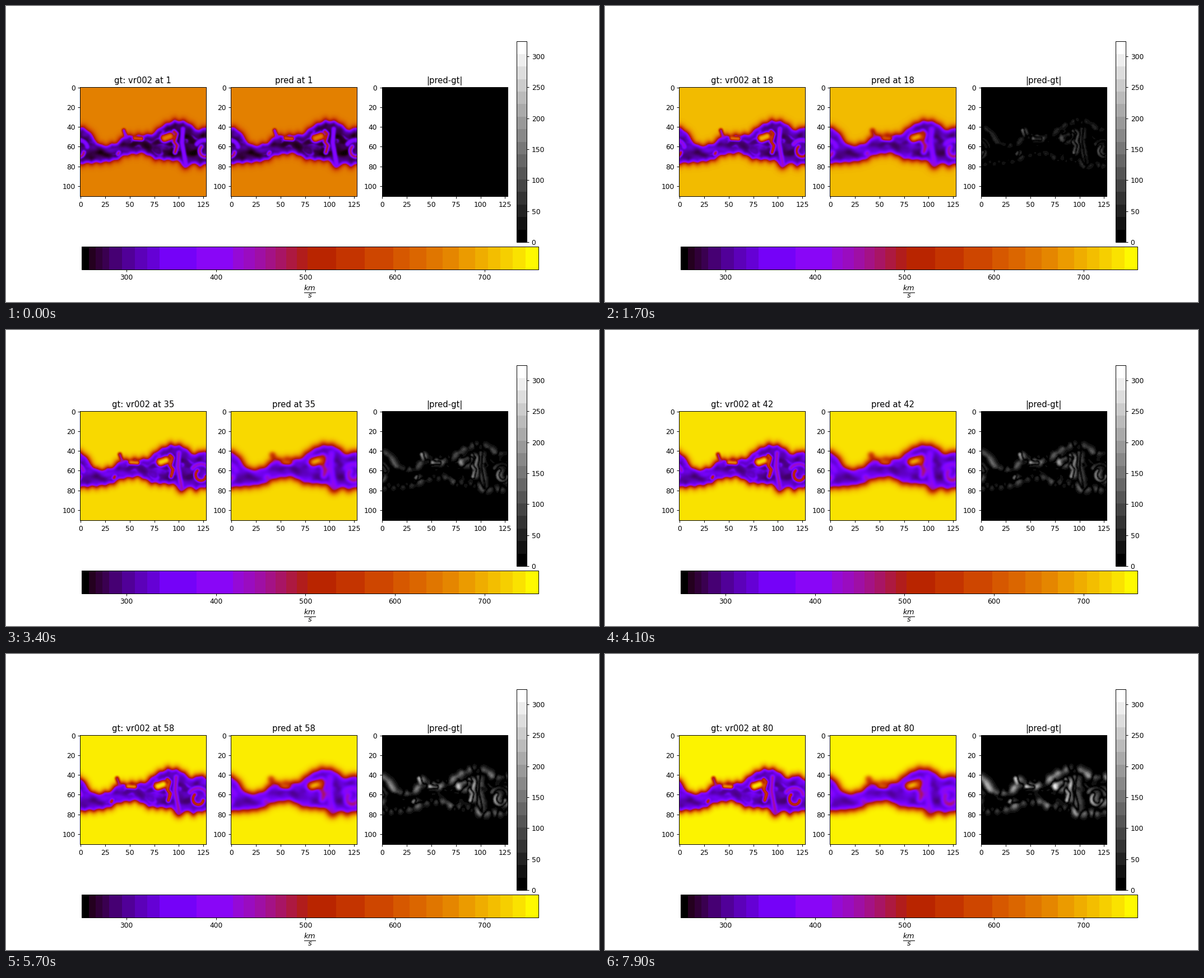
Recreate the animation shown at these times as a matplotlib script. Size 1058 px wide and 529 px high, loop 8000 ms.

```python
import numpy as np
import matplotlib.pyplot as plt
from matplotlib.animation import FuncAnimation
from matplotlib.cm import ScalarMappable
from matplotlib.colors import ListedColormap, Normalize

NX, NY, STEPS = 128, 111, 80
VMIN, VMAX, ERR_MAX = 250, 760, 324
CALM = 655  # undisturbed speed at the first step

X, Y = np.meshgrid(np.arange(NX, dtype=float), np.arange(NY, dtype=float))
KX = np.fft.fftfreq(NX)[None, :]
KY = np.fft.fftfreq(NY)[:, None]


def transform(field, shift=0.0, sx=0.0, sy=0.0):
    """Move the field left by shift and blur it."""
    gain = np.exp(-2 * np.pi ** 2 * ((sx * KX) ** 2 + (sy * KY) ** 2))
    spec = np.fft.fft2(field) * gain * np.exp(2j * np.pi * KX * shift)
    return np.fft.ifft2(spec).real


def noise(rng, sx, sy):
    n = transform(rng.normal(size=X.shape), 0, sx, sy)
    return n / n.std()


def dist(pts):
    """Distance to a polyline that repeats every NX columns."""
    best = np.full(X.shape, np.inf)
    for (x0, y0), (x1, y1) in zip(pts[:-1], pts[1:]):
        dx, dy = x1 - x0, y1 - y0
        for off in (-NX, 0, NX):
            px, py = X - x0 - off, Y - y0
            s = np.clip((px * dx + py * dy) / (dx * dx + dy * dy), 0, 1)
            best = np.minimum(best, np.hypot(px - s * dx, py - s * dy))
    return best


def outline(x, keys, phase):
    """Rounded periodic curve through the keys with a small ripple."""
    kx, ky = zip(*keys)
    y = np.mean([np.interp(x + o, kx, ky, period=NX) for o in (-1.5, 0, 1.5)], axis=0)
    return y + 0.7 * np.sin(2 * np.pi * 14 * x / NX + phase)


def arc(cx, cy, r0, r1, a0, a1):
    a = np.radians(np.linspace(a0, a1, 14))
    r = np.linspace(r0, r1, 14)
    return list(zip(cx + r * np.cos(a), cy + r * np.sin(a)))


TOP = [(0, 38), (10, 43), (17, 54), (23, 58), (36, 55), (44, 48), (72, 46),
       (82, 37.5), (95, 31.5), (108, 33), (120, 42)]
BOTTOM = [(0, 79), (24, 77.5), (36, 75.5), (46, 70), (64, 68), (76, 74.5),
          (99, 76), (107, 85), (113, 78), (122, 82)]

# (speed, half width, path)
FEATURES = [
    (390, 2.0, [(44, 43.5), (46, 49)]),                  # notch
    (400, 2.0, [(104, 42), (103, 56), (107, 78)]),       # column
    (390, 2.0, arc(127.5, 63, 11, 8, -150, -20)),        # swirl
    (480, 1.8, arc(127, 65, 6.5, 4.5, 230, 10)),
    (470, 1.8, [(38, 67.5), (39, 66)]),
    (600, 2.1, [(55, 51.5), (62, 52)]),                  # small cavity
    (500, 1.9, [(95, 44.5), (97.5, 47), (95, 55), (98, 59), (96, 66)]),
    (650, 4.2, [(85.5, 51.5), (91, 49.5)]),              # large cavity
]


def make_base():
    rng = np.random.default_rng(7)
    inside = (Y > outline(X, TOP, 2)) & (Y < outline(X, BOTTOM, 0))
    xs = np.arange(0, NX + 1, 2)
    edge = np.minimum(*(dist(list(zip(xs, outline(xs, keys, ph))))
                        for keys, ph in ((TOP, 2), (BOTTOM, 0))))
    d = np.where(inside, edge, -edge)
    # steep sigmoid from calm to slow wind with a faint outer halo
    v = 275 + (CALM - 275) / (1 + np.exp((d - 1.4) / 1.25))
    v -= 14 * np.exp(-(np.minimum(d + 2, 0) / 3) ** 2) * ~inside
    core = np.clip((d - 2.5) / 4, 0, 1)
    n, m = noise(rng, 3.2, 1.9), noise(rng, 4, 4)
    v += core * (12 * n + 60 * np.exp(-(n / 0.28) ** 2) * np.clip(m + 0.2, 0, 1.2))
    for speed, width, path in FEATURES:
        v += (speed - v) * np.exp(-(dist(path) / width) ** 3)
    return transform(np.clip(v, 252, CALM), 0, 0.5, 0.5)


BASE = make_base()


def fields(step):
    t = step - 1
    gain = 1 + 0.152 * (1 - np.exp(-t / 22))  # wind speeds up outwards
    soft = 0.5 * (t / (STEPS - 1)) ** 0.5
    blur = 2.2 * (1 - np.exp(-t / 16))
    gt = gain * transform(BASE, 0.12 * t, soft, soft)
    pred = gain * transform(BASE, 0.065 * t, blur, 0.8 * blur)
    return gt, pred, np.abs(pred - gt)


def banded_gnuplot():
    """Gnuplot colours in 30 flat bands, wide where the hue changes slowly."""
    edges = np.interp(np.arange(31), [0, 4, 8, 10, 17, 20, 25, 30],
                      [0, 0.061, 0.171, 0.332, 0.495, 0.683, 0.862, 1])
    mids = (edges[:-1] + edges[1:]) / 2
    mids[0], mids[-1] = 0, 0.99
    x = (np.arange(1024) + 0.5) / 1024
    colors = plt.get_cmap("gnuplot")(mids)
    return ListedColormap(colors[np.searchsorted(edges, x) - 1])


fig, axes = plt.subplots(1, 3, figsize=(12, 6), dpi=529 / 6, facecolor="white")
speed = Normalize(VMIN, VMAX)
looks = [("gnuplot", speed), ("gnuplot", speed),
         (plt.get_cmap("gray", 16), Normalize(0, ERR_MAX))]
images = [ax.imshow(np.zeros((NY, NX)), cmap=cmap, norm=norm)
          for ax, (cmap, norm) in zip(axes, looks)]
for ax in axes:
    ax.set_xticks(range(0, 126, 25))
    ax.set_yticks(range(0, 101, 20))

bar = fig.colorbar(ScalarMappable(speed, banded_gnuplot()), ax=axes,
                   orientation="horizontal", fraction=0.1, pad=0.02,
                   ticks=range(300, 701, 100))
bar.set_label(r"$\frac{km}{s}$", fontsize=15)
fig.colorbar(images[2], ax=axes, fraction=0.05, pad=0.02, ticks=range(0, 301, 50))


def update(i):
    step = i + 1
    titles = (f"gt: vr002 at {step}", f"pred at {step}", "|pred-gt|")
    for ax, im, data, text in zip(axes, images, fields(step), titles):
        im.set_data(data)
        ax.set_title(text)
    return images


anim = FuncAnimation(fig, update, frames=STEPS, interval=100, repeat=True,
                     repeat_delay=0, init_func=lambda: update(0))
plt.show()
```
